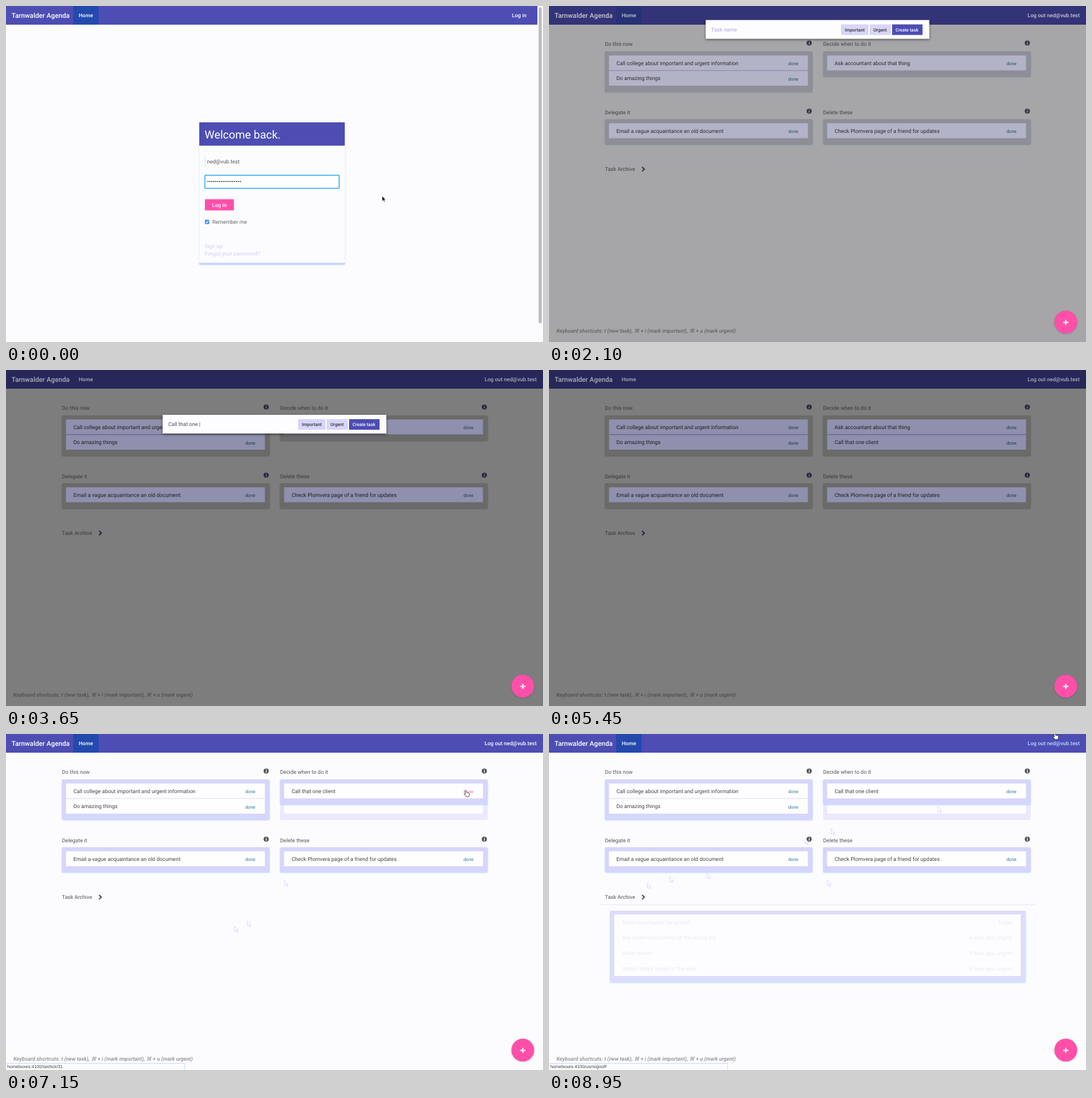
Recreate the animation shown at these times as an HTML page. Size 864x540 px, loop 9 s.

```html
<!DOCTYPE html>
<html lang="en">
<head>
<meta charset="utf-8">
<title>Task board</title>
<style>
html, body { margin: 0; width: 100%; height: 100%; overflow: hidden; background: #fcfcff; }
svg { display: block; width: 864px; height: 540px; }
text { font: 8.55px Roboto, sans-serif; white-space: pre; text-rendering: geometricPrecision; }
.brand { font-size: 10.8px; font-weight: 500; }
.nav { font-weight: 500; }
.welcome { font-size: 18px; fill: #fff; }
.small { font-size: 7.25px; }
.button { font-size: 7.2px; font-weight: 500; }
.status { font: 7.2px "Liberation Sans", Arial, sans-serif; fill: #444; }
.foot { font-style: italic; font-weight: 500; fill: var(--foot); }
.title { fill: var(--title); }
.task { fill: var(--task); }
.done { fill: var(--done); }
.link { font-size: 8.8px; fill: #cfcdfb; }
</style>
</head>
<body>
<svg id="stage" viewBox="0 0 864 540"></svg>
<script>
const LOOP = 9000;
const MAIL = 'ned@vub.test';
const TASK = 'Call that one client';
const HOST = 'homeboxes';
const PINK = '#ff4fa9', INDIGO = '#4d4db3', LILAC = '#d7d5fb';

// Each colour without and with the dimming overlay
const PALETTE = {
  bg: ['#fcfcff', '#7d7d7e'],
  bar: [INDIGO, '#27275a'],
  active: ['#2449ad', '#27275a'],
  nav: ['#ffffff', '#aeaebb'],
  title: ['#555558', '#38383e'],
  panel: ['#d7d5fb', '#6b6b68'],
  glow: ['#a9d8ff', '#5c5c5c'],
  row: ['#fefeff', '#8f8fae'],
  rule: ['#dddcf0', '#5b5b92'],
  task: ['#444447', '#1e1e1e'],
  done: ['#28799f', '#1c3c40'],
  foot: ['#8b8b90', '#4d4d4c'],
  icon: ['#505054', '#26263c']
};

// Markup helpers
const rect = (x, y, w, h, fill, extra = '') =>
  `<rect x="${x}" y="${y}" width="${w}" height="${h}" fill="${fill}" ${extra}/>`;
const text = (x, y, label, cls = '', extra = '') =>
  `<text x="${x}" y="${y}" class="${cls}" ${extra}>${label}</text>`;
const group = (id, body, extra = '') => `<g id="${id}" ${extra}>${body}</g>`;
const path = (d, extra) => `<path d="${d}" ${extra}/>`;

function panel(x, y, tasks, hotFirst) {
  const height = 15.5 + tasks.length * 24.5;
  let out = rect(x, y, 334, height, 'var(--panel)', 'rx="2" filter="url(#glow)"');
  tasks.forEach((label, i) => {
    const top = y + 6.5 + i * 24.5;
    out += rect(x + 6.5, top, 320, 24, 'var(--row)');
    if (i) out += rect(x + 6.5, top - .5, 320, .8, 'var(--rule)');
    out += text(x + 18.5, top + 15, label, 'task');
    out += text(x + 295, top + 15.6, 'done', 'small done', hotFirst && !i ? 'style="fill:var(--hot)"' : '');
  });
  return out;
}

function heading(x, y, label) {
  return text(x, y + 4, label, 'title') +
    `<circle cx="${x + 328.6}" cy="${y - .5}" r="4.1" fill="var(--icon)"/>` +
    rect(x + 327.9, y - 1, 1.5, 3, 'var(--bg)') + rect(x + 327.9, y - 3.1, 1.5, 1.3, 'var(--bg)');
}

const topBar = (width, right) =>
  rect(0, 0, width, 30, 'var(--bar)') + rect(108, 0, 41, 30, 'var(--active)') +
  text(9, 19, 'Tarnwalder Agenda', 'brand', 'fill="var(--nav)"') +
  text(117, 18, 'Home', 'nav', 'fill="var(--nav)"') + right;

const login = topBar(855, text(814, 18, 'Log in', 'nav', 'fill="#fff"')) +
  rect(857, 2, 5, 508, '#bdbdbf', 'rx="2.5"') +
  rect(311, 187, 234.5, 228, '#fcfcff', 'filter="url(#glow)"') +
  rect(311, 412.5, 234.5, 3, '#cfd2fd') +
  rect(311, 187, 234, 37.5, INDIGO) +
  text(319.5, 212.5, 'Welcome back.', 'welcome') +
  rect(320, 240, .8, 18, '#d9d8f2') +
  text(323.5, 253, MAIL, '', 'fill="#59595c"') +
  rect(320, 272, .8, 20, '#d9d8f2') +
  rect(320, 272, 216, 21, '#fff', 'id="inputFocus" stroke="#62bff3" stroke-width="2" rx="1"') +
  Array.from({ length: 18 }, (_, i) => `<circle cx="${325 + i * 3.05}" cy="282" r="1" fill="#444"/>`).join('') +
  rect(319, 309.5, 49, 20, '#fff', 'id="buttonFocus" stroke="#62bff3" stroke-width="2" rx="1"') +
  rect(320, 310.5, 46.7, 18, PINK) +
  text(331.5, 323, 'Log in', 'nav', 'fill="#fff"') +
  rect(320, 343.5, 7, 7, '#3b8ff0', 'rx="1"') +
  path('M321.5 347 l1.5 1.6 l2.7-3.4', 'fill="none" stroke="#fff" stroke-width="1.1"') +
  text(332, 349.8, 'Remember me', '', 'fill="#666669"') +
  text(319.5, 389, 'Sign up', 'link') + text(319.5, 401.3, 'Forgot your password?', 'link');

const archiveRows = [
  ['Read new chapter for school', 'Today'], ['Buy some train tickets for the spring trip', '4 days ago, urgent'],
  ['Water plants', '5 days ago, urgent'], ['Return library books to the desk', '6 days ago, urgent']
];
const archive = rect(82, 274, 701, .8, '#dddcf8') +
  rect(98, 284, 669, 115, LILAC, 'rx="2" filter="url(#glow)"') + rect(105, 290, 654, 99, '#fefeff') +
  group('archiveText', archiveRows.map(([label, age], i) => {
    const y = 290 + i * 24.75;
    return (i ? rect(105, y, 654, .7, '#dddcf0') : '') + text(118, y + 15.5, label, 'task') +
      text(745, y + 15.5, age, 'task', 'text-anchor="end"');
  }).join(''));

const home = topBar(864, text(770, 18, 'Log out ' + MAIL, 'nav', 'fill="var(--logout)"')) +
  heading(90, 60, 'Do this now') + heading(441, 60, 'Decide when to do it') +
  heading(90, 169.5, 'Delegate it') + heading(441, 169.5, 'Delete these') +
  panel(90, 73, ['Call college about important and urgent information', 'Do amazing things']) +
  panel(90, 182, ['Email a vague acquaintance an old document']) +
  panel(441, 182, ['Check Plomvera page of a friend for updates']) +
  group('plan1', panel(441, 73, ['Ask accountant about that thing'])) +
  group('plan2', panel(441, 73, ['Ask accountant about that thing', TASK], true)) +
  group('plan3', rect(441, 112, 334, 26, '#eae9fd', 'rx="2"') + rect(447.5, 112, 320, 16, '#fdfdff') +
    panel(441, 73, [TASK], true)) +
  text(90, 265.2, 'Task Archive', 'title') +
  path('M149.8 258.8 l3.5 3.4 l-3.5 3.4', 'id="chevron" fill="none" stroke="var(--icon)" stroke-width="2"') +
  group('archive', archive) +
  text(12, 525, 'Keyboard shortcuts: t (new task), ⌘ + i (mark important), ⌘ + u (mark urgent)', 'foot') +
  `<circle cx="831.5" cy="508" r="18.3" fill="${PINK}" filter="url(#lift)"/>` +
  path('M827.5 508.5h8M831.5 504.5v8', 'stroke="#fff" stroke-width="2"');

const modal = rect(252, 0, 360, 30, '#fdfdff', 'filter="url(#shade)"') +
  text(261, 18, '', '', 'id="taskField"') +
  rect(470, 7, 44, 17, LILAC, 'id="important"') + text(476, 18.3, 'Important', 'button', 'id="importantLabel"') +
  rect(516, 7, 34, 17, LILAC) + text(522, 18.3, 'Urgent', 'button', 'fill="#333"') +
  rect(552, 7, 49, 17, INDIGO) + text(557.5, 18.3, 'Create task', 'button', 'fill="#fff"');

const ARROW = 'M0 0V9L2 7.2L3.5 10.3L5 9.6L3.6 6.6H6.2Z';
const HAND = 'M1.5 1Q2.6 0 3.4 1.2L4 4L6.5 4.4L8.7 5.3V8L7.4 10.8H3.2L.4 7.2Q0 5.8 2.2 6.5Z';

// Faint traces left along the pointer's way: x, y, from, to
const TRACES = [
  [601, 307, 500, 1750], [583, 311, 720, 1750], [550, 312, 880, 1750],
  [368, 309, 6050, 7900], [388, 300, 6250, 7900], [448, 235, 6450, 9000],
  [626, 117, 7450, 9000], [454, 152, 7600, 9000], [412, 168, 8600, 9000],
  [254, 223, 7720, 9000], [194, 229, 7800, 9000], [158, 239, 7880, 9000]
];
const PATH = [
  [300, 605, 305], [500, 604, 308], [700, 585, 311], [850, 552, 313], [1150, 350, 314], [5900, 366, 314],
  [6200, 389, 301], [6400, 448, 236], [6750, 737, 90], [7300, 737, 90], [7420, 628, 117],
  [7560, 457, 152], [7700, 257, 223], [7780, 196, 229], [7900, 150, 258], [8450, 150, 258],
  [8600, 415, 168], [8750, 628, 118], [8870, 811, -2]
];

const shadow = (id, dy, blur, color, opacity) =>
  `<filter id="${id}" x="-20%" y="-30%" width="140%" height="180%">
  <feDropShadow dx="0" dy="${dy}" stdDeviation="${blur}" flood-color="${color}" flood-opacity="${opacity}"/></filter>`;

const stage = document.getElementById('stage');
stage.innerHTML = `<defs>${shadow('glow', 1, 1.2, 'var(--glow)', 1)}
  ${shadow('shade', 1.5, 2, '#000', .5)}${shadow('lift', .5, .9, '#000', .3)}</defs>` +
  rect(0, 0, 864, 540, 'var(--bg)') +
  group('login', login) + group('home', home) + group('modal', modal) +
  group('status', rect(-.5, 529.5, 288, 11, '#fdfdff', 'stroke="#c4d8fa" stroke-width=".9"') +
    text(2, 537.3, '', 'status', 'id="statusText"')) +
  TRACES.map(([x, y], i) => group('trace' + i,
    path(ARROW, `transform="translate(${x} ${y})" fill="none" stroke="#dad9ff" stroke-width=".9"`))).join('') +
  path('', 'id="pointer" stroke-width=".8"');

const el = id => document.getElementById(id);
const show = (id, on) => { el(id).style.display = on ? '' : 'none'; };
const clamp = v => Math.max(0, Math.min(1, v));
const ramp = (t, from, to) => clamp((t - from) / (to - from));
const within = (t, from, to) => t >= from && t < to;

function mix(a, b, k) {
  const channel = (c, i) => parseInt(c.slice(1 + i * 2, 3 + i * 2), 16);
  return `rgb(${[0, 1, 2].map(i => Math.round(channel(a, i) * (1 - k) + channel(b, i) * k))})`;
}

function pointerAt(t) {
  const next = PATH.findIndex(p => p[0] > t);
  if (next === 0) return PATH[0].slice(1);
  if (next < 0) return PATH[PATH.length - 1].slice(1);
  const [a, b] = [PATH[next - 1], PATH[next]];
  const k = ramp(t, a[0], b[0]);
  return [a[1] + (b[1] - a[1]) * k, a[2] + (b[2] - a[2]) * k];
}

function drawModal(t) {
  const open = within(t, 2050, 5400);
  show('modal', open);
  if (!open) return;
  const drop = 1 - (1 - ramp(t, 2050, 2240)) ** 2.5;
  const y = -36 + 108 * (drop - ramp(t, 5200, 5400) ** 2);
  el('modal').setAttribute('transform', `translate(0 ${y})`);
  const count = Math.max(0, Math.min(TASK.length, Math.floor((t - 2400) / 89)));
  const caret = count && (t < 4200 || t % 1000 < 500) ? '|' : '';
  el('taskField').textContent = count ? TASK.slice(0, count) + caret : 'Task name';
  el('taskField').setAttribute('fill', count ? '#4c4c55' : '#aaa8da');
  const marked = t >= 4450;
  el('important').setAttribute('fill', marked ? INDIGO : LILAC);
  el('importantLabel').setAttribute('fill', marked ? '#fff' : '#333');
}

function draw(t) {
  const dark = ramp(t, 2000, 2150) - ramp(t, 5480, 5650);
  for (const name in PALETTE) stage.style.setProperty('--' + name, mix(...PALETTE[name], dark));
  const overDone = within(t, 6720, 7340), overLogout = t >= 8820;
  stage.style.setProperty('--hot', overDone ? '#ec6d9c' : 'var(--done)');
  stage.style.setProperty('--logout', overLogout ? '#bdd9ff' : 'var(--nav)');

  show('login', t < 1750);
  show('home', t >= 1750);
  show('inputFocus', t < 1300);
  show('buttonFocus', t >= 1300);
  show('plan1', t < 5200);
  show('plan2', within(t, 5200, 7000));
  show('plan3', t >= 7000);

  const archiveOpen = within(t, 7950, 8420);
  show('archive', t >= 7950);
  el('archive').setAttribute('opacity', archiveOpen ? 1 : .8);
  el('archiveText').setAttribute('opacity', archiveOpen ? 1 : .12);
  el('chevron').setAttribute('transform', archiveOpen ? 'rotate(90 151.5 262.2)' : '');
  drawModal(t);

  const status = within(t, 1300, 1750) ? `Waiting for ${HOST}...`
    : overDone ? `${HOST}:4100/set/tick/31`
    : overLogout ? `${HOST}:4100/usr/signoff` : '';
  show('status', status);
  el('statusText').textContent = status;

  TRACES.forEach(([, , from, to], i) => show('trace' + i, within(t, from, to)));
  const hand = within(t, 1120, 1750) || overDone || within(t, 7880, 8480) || overLogout;
  const pointer = el('pointer');
  show('pointer', t < 2050 || t >= 5950);
  pointer.setAttribute('d', hand ? HAND : ARROW);
  pointer.setAttribute('fill', hand ? '#fff' : '#15152c');
  pointer.setAttribute('stroke', hand ? '#333344' : '#fff');
  pointer.setAttribute('transform', `translate(${pointerAt(t)})`);
}

const start = performance.now();
function tick() {
  draw((performance.now() - start) % LOOP);
  requestAnimationFrame(tick);
}
tick();
</script>
</body>
</html>
```
